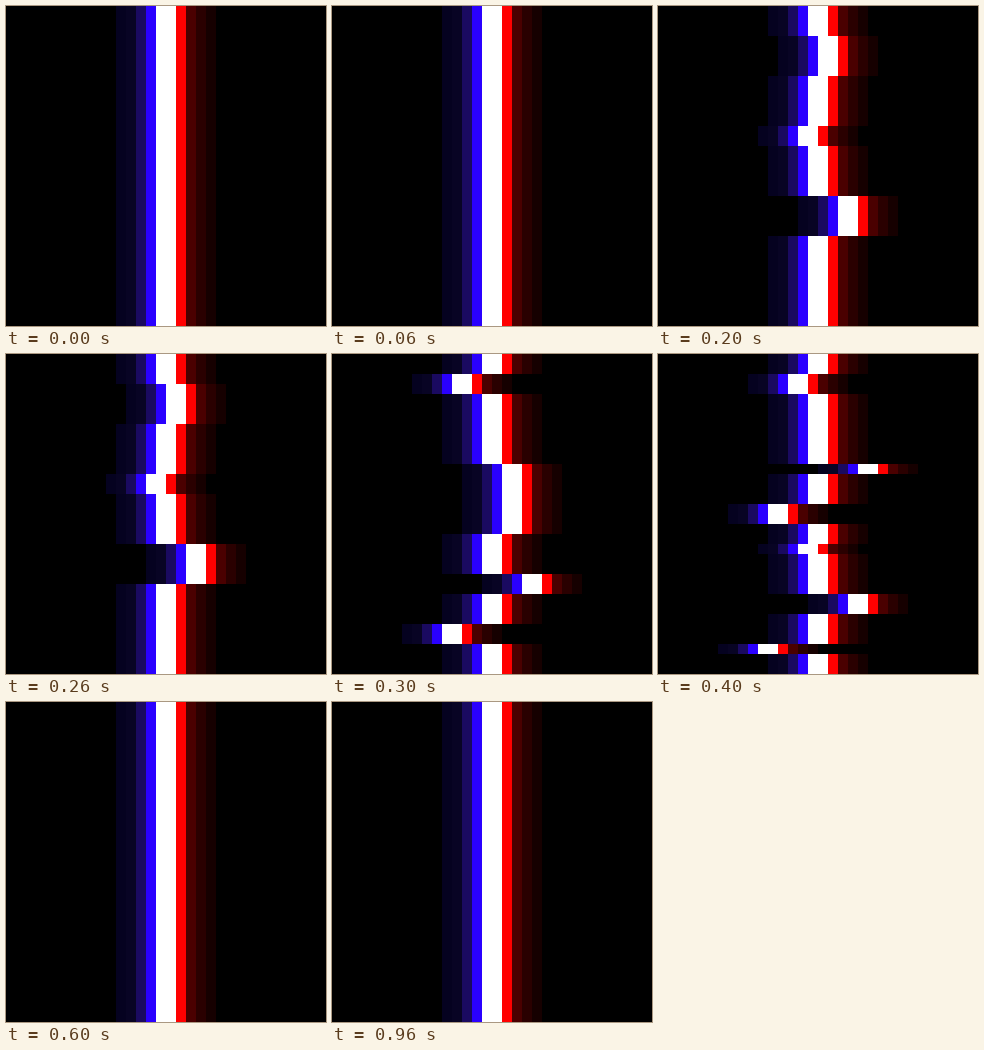
An HTML page with a canvas for the animation above (1200 ms loop, 320 by 320 pixels).

```html
<!DOCTYPE html>
<html lang="en">
<head>
<meta charset="utf-8">
<title>Glitching light bar</title>
<style>
  html, body { margin: 0; width: 100%; height: 100%; overflow: hidden; background: #000; }
  canvas { display: block; width: 100vw; height: 100vh; image-rendering: pixelated; }
</style>
</head>
<body>
<canvas width="32" height="32"></canvas>
<script>
const ctx = document.querySelector('canvas').getContext('2d');
const SIZE = 32, STEP = 100, LOOP = 1200, LEFT = 11;

// One cell per colour, from left to right.
const BAR = ['#050220', '#080424', '#1a0a60', '#2a00ff', '#fff', '#fff',
             '#f00', '#4a0000', '#2a0000', '#160000'];
const RED_START = 6;

// Torn bands per step: [top, height, shift, shift of the red half if different]
const TEARS = [
  [],
  [[0, 2, 2], [3, 3, -3], [8, 1, 1], [12, 1, -1], [17, 1, -1, -2], [22, 2, 4], [27, 1, -4]],
  [[3, 4, 1], [12, 2, -1], [19, 4, 3]],
  [[2, 2, -3], [11, 7, 2], [22, 2, 4], [27, 2, -4]],
  [[2, 2, -2], [11, 1, 5], [15, 2, -4], [19, 1, -1], [24, 2, 4], [29, 1, -5]],
  [[1, 2, 2], [7, 2, 9], [12, 2, -4], [17, 1, -5], [19, 3, 5], [25, 1, -3], [27, 2, 4]]
];

function drawBand(top, height, shift, redShift = shift) {
  ctx.fillStyle = '#000';
  ctx.fillRect(0, top, SIZE, height);
  BAR.forEach((color, i) => {
    ctx.fillStyle = color;
    ctx.fillRect(LEFT + i + (i < RED_START ? shift : redShift), top, 1, height);
  });
}

let shown = -1;
function tick(now) {
  const step = Math.floor((now % LOOP) / STEP) % LOOP;
  const pose = step < TEARS.length ? step : 0;
  if (pose !== shown) {
    drawBand(0, SIZE, 0);
    TEARS[pose].forEach(tear => drawBand(...tear));
    shown = pose;
  }
  requestAnimationFrame(tick);
}
tick(0);
</script>
</body>
</html>
```
